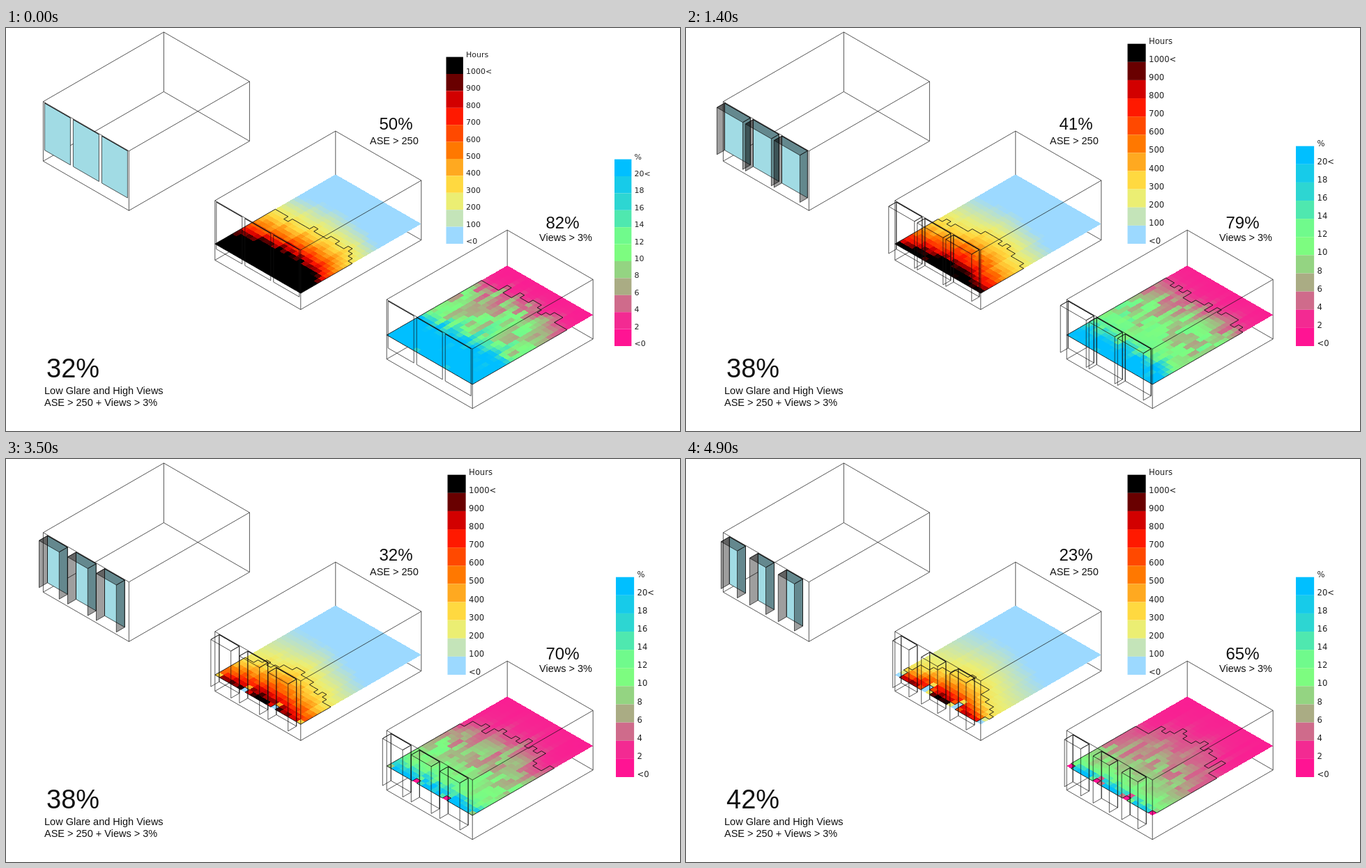
Recreate the animation shown at these times as an HTML page. Size 967x579 px, loop 5.6 s.

```html
<!DOCTYPE html>
<html lang="en">
<head>
<meta charset="utf-8">
<title>Shading study</title>
<style>
  html, body { margin: 0; width: 100%; height: 100%; overflow: hidden; background: #fff; }
  svg { display: block; }
  text { font-family: "Liberation Sans", Arial, sans-serif; font-size: 14.5px; fill: #111; }
  .key text { font-family: "DejaVu Sans", Verdana, sans-serif; font-size: inherit; fill: #222; }
  .cell { shape-rendering: crispEdges; }
  .line, .edge { fill: none; stroke: #111; stroke-width: .7; }
  .edge { stroke-width: .9; }
  .glass, .fin { stroke: #111; stroke-width: .7; }
  .glass { fill: #a1dbe4; }
  .fin { fill: rgba(0, 0, 0, .38); }
</style>
</head>
<body>
<svg id="stage" width="967" height="579" viewBox="0 0 967 579"></svg>
<script>
const STEP = 700, STEPS = 8, COLS = 20, ROWS = 28;
const W = 123, D = 173, H = 85.6, BAY = W / 3;
const CU = W / COLS, CV = D / ROWS;

// Shares printed beside each model, one per step
const GLARE = [50, 46, 41, 38, 35, 32, 28, 23];
const VIEWS = [82, 80, 79, 75, 72, 70, 68, 65];
const BOTH = [32, 34, 38, 37, 38, 38, 40, 42];

// Colour stops: legend index, red, green, blue
const HEAT = [[0, 156, 217, 255], [2, 235, 238, 115], [3, 255, 217, 64], [5, 255, 120, 0],
  [7, 255, 25, 0], [8, 210, 0, 0], [10, 0, 0, 0]];
const VIEW = [[0, 255, 20, 147], [1, 243, 42, 146], [3, 170, 172, 132], [5, 125, 252, 128],
  [6, 112, 250, 140], [8, 45, 214, 210], [10, 0, 191, 255]];

const clamp = (x, a = 0, b = 1) => Math.min(b, Math.max(a, x));
const mix = (a, b, t) => a + (b - a) * t;
const arch = i => Math.sin(Math.PI * (i + .5) / COLS);
const rand = (a, b, c) => {
  const x = Math.sin(a * 127.1 + b * 311.7 + c * 74.7 + 5.3) * 43758.5453;
  return x - Math.floor(x);
};

function ramp(stops, x) {
  x = clamp(x, 0, 10);
  const k = stops.findIndex((p, n) => n && x <= p[0]);
  const [a, b] = [stops[k - 1], stops[k]];
  return `rgb(${[1, 2, 3].map(n => Math.round(mix(a[n], b[n], (x - a[0]) / (b[0] - a[0]))))})`;
}

// Isometric projection: u along the facade, v into the room, z up
const iso = (box, u, v, z) =>
  [53.4 + 246.4 * box + u + v, 191.3 + 142.2 * box + .577 * (u - v) - z].map(n => n.toFixed(1)).join();
const poly = (cls, pts, close = true) => `<path class="${cls}" d="M${pts.join('L')}${close ? 'Z' : ''}"/>`;

const halfWidth = s => 18.5 - 1.38 * Math.max(0, s - 2);
const finDepth = s => Math.min(12, 5.5 * s);

// Cells behind the wall between two windows get less light
function wallShade(i, j, s, gain) {
  const off = Math.abs((i + .5) * CU % BAY - BAY / 2) - halfWidth(s);
  return off > 0 ? clamp(1 - .2 * off + gain * j) : 1;
}

// Zone depth in rows: its mean follows the printed share, bulging mid-room
const zoneEnd = (i, share, bulge) => share / 100 * ROWS + bulge * (arch(i) - .64);

function glare(i, j, s) {
  const v = j + .5, t = Math.min(1, s / 4);
  const tooth = 1.1 * rand(i >> 1, s, 1) + 1.2 * rand(i, s, 2) - 1.15;
  const end = zoneEnd(i, GLARE[s], 2 + .4 * s) + tooth;
  if (v > end) {
    const zero = mix(19.5, 18 - 3 * t, (i + .5) / COLS) + (2.5 - t) * arch(i) + rand(i, 4, 4) - .5;
    return 250 * (1 - (v - end) / Math.max(2, zero - end));
  }
  const heat = (1.42 + 1.05 * Math.exp(-s / 1.4)) * (.82 + .18 * arch(i));
  const val = 250 * Math.exp(heat * (1 - v / end));
  const grain = .14 * (rand(i, j, 3) - .5) * clamp((val - 250) / 150);
  return val * (1 + grain) * wallShade(i, j, s, .5);
}

function view(i, j, s) {
  const end = zoneEnd(i, VIEWS[s], 4.2 * clamp(s - 2)) + 3 * (rand(i, s, 6) - .5);
  const r = (j + .5) / end;
  if (r > 1) return .8 + 2.2 * Math.exp((1 - r) / (.08 + .025 * s));
  const near = .05 + .32 * Math.exp(-s / 2.5);
  const val = 3 + 7.5 * (1 - r ** (5 - .57 * s)) + 13 / (1 + Math.exp((r - near) / .05));
  const run = Math.floor(j / 3 + rand(i, 1, 7));
  const grain = (rand(i, run, 8 + s * .01) - .6) * clamp((val - 3) / 3) * (r > .45 ? .7 : .3);
  return val * (1 + grain) * wallShade(i, j, s, .8);
}

function plane(box, s) {
  const [z, field, stops, unit, limit] = box === 1 ? [23.3, glare, HEAT, 100, 250] : [34.6, view, VIEW, 2, 3];
  const vals = Array.from({ length: COLS }, (_, i) => Array.from({ length: ROWS }, (_, j) => field(i, j, s)));
  const inside = (i, j) => vals[i]?.[j] >= limit;
  const p = (i, j) => iso(box, i * CU, j * CV, z);
  let cells = '', rim = '';
  for (let i = 0; i < COLS; i++) for (let j = 0; j < ROWS; j++) {
    const [a, b, c, d] = [p(i, j), p(i + 1, j), p(i + 1, j + 1), p(i, j + 1)];
    cells += `<path class="cell" fill="${ramp(stops, vals[i][j] / unit)}" d="M${a}L${b}L${c}L${d}Z"/>`;
    if (!inside(i, j)) continue;
    if (!inside(i - 1, j)) rim += `M${a}L${d}`;
    if (!inside(i + 1, j)) rim += `M${b}L${c}`;
    if (!inside(i, j - 1)) rim += `M${a}L${b}`;
    if (!inside(i, j + 1)) rim += `M${d}L${c}`;
  }
  return cells + `<path class="edge" d="${rim}"/>`;
}

function windows(box, s) {
  const hw = halfWidth(s), d = finDepth(s), top = 84.6, low = 17;
  const fin = box ? 'line' : 'fin';
  const p = (u, v, z) => iso(box, u, v, z);
  const side = u => poly(fin, [p(u, 0, top), p(u, -d, top), p(u, -d, low), p(u, 0, low)]);
  let out = '';
  for (let n = 0; n < 3; n++) {
    const l = BAY * (n + .5) - hw, r = l + 2 * hw;
    out += poly(box ? 'line' : 'glass', [p(l, 0, top), p(r, 0, top), p(r, 0, low), p(l, 0, low)]);
    if (d) out += side(r) + side(l) + poly(fin, [p(l, 0, top), p(r, 0, top), p(r, -d, top), p(l, -d, top)]);
    out += poly('edge', [p(l, 0, top), p(r, 0, top)], false);
  }
  return out;
}

function room(box, s) {
  const p = (u, v, z) => iso(box, u, v, z);
  const seg = (...pts) => poly('line', pts, false);
  const back = seg(p(0, 0, 0), p(0, D, 0), p(W, D, 0)) + seg(p(0, D, 0), p(0, D, H));
  const front = poly('line', [p(0, 0, H), p(W, 0, H), p(W, D, H), p(0, D, H)]) +
    seg(p(0, 0, H), p(0, 0, 0), p(W, 0, 0), p(W, D, 0), p(W, D, H)) + seg(p(W, 0, 0), p(W, 0, H));
  return back + (box ? plane(box, s) : '') + windows(box, s) + front;
}

function legend(x, bottom, stops, title, unit, s) {
  const k = Math.min(s, 2), h = 24.4 + .86 * k, left = x + k;
  let out = '';
  for (let n = 11; n >= 0; n--) {
    const y = bottom - n * h;
    const label = n === 11 ? title : n === 10 ? n * unit + '&lt;' : n ? n * unit : '&lt;0';
    if (n) out += `<rect x="${left}" y="${y}" width="${h}" height="${h}" fill="${ramp(stops, n - 1)}"/>`;
    out += `<text x="${left + 28.5 + k}" y="${y}">${label}</text>`;
  }
  return `<g class="key" font-size="${11 + .3 * k}">${out}</g>`;
}

const text = (x, y, str, size = 14.5) => `<text x="${x}" y="${y}" style="font-size:${size}px">${str}</text>`;

function scene(s) {
  return [0, 1, 2].map(b => room(b, s)).join('') +
    legend(631.5, 310, HEAT, 'Hours', 100, s) +
    legend(873, 457, VIEW, '%', 2, s) +
    text(535.5, 145.5, GLARE[s] + '%', 24) + text(522, 167, 'ASE &gt; 250') +
    text(774.5, 287.5, VIEWS[s] + '%', 24) + text(765, 306, 'Views &gt; 3%') +
    text(58, 502, BOTH[s] + '%', 38) +
    text(55, 526, 'Low Glare and High Views') + text(55, 543, 'ASE &gt; 250 + Views &gt; 3%');
}

const stage = document.getElementById('stage');
const scenes = Array.from({ length: STEPS }, (_, s) => scene(s));
const start = performance.now();
let shown = -1;

function tick() {
  const s = Math.floor((performance.now() - start) / STEP) % STEPS;
  if (s !== shown) stage.innerHTML = scenes[shown = s];
  requestAnimationFrame(tick);
}
tick();
</script>
</body>
</html>
```
